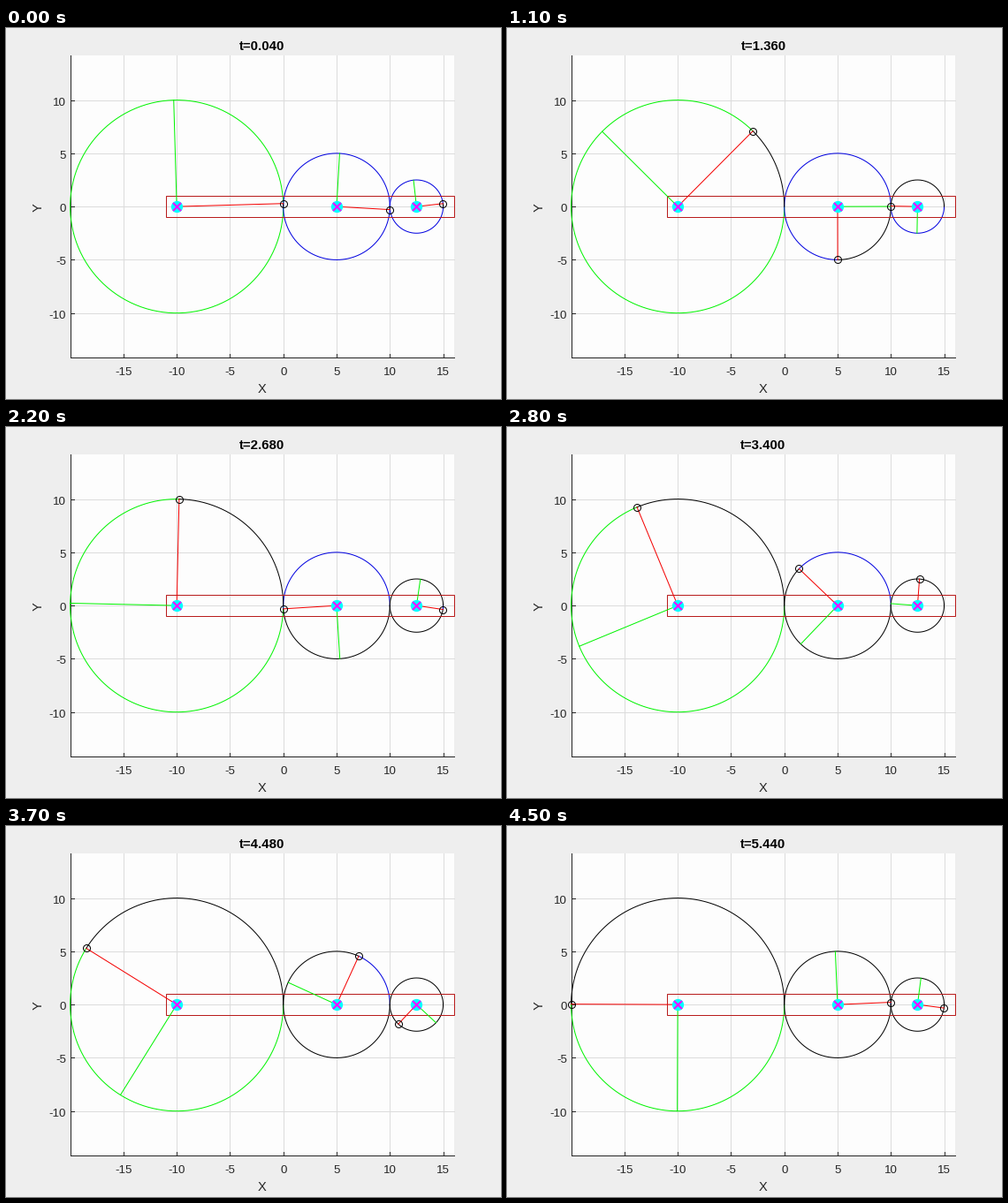
A matplotlib script that plays this animation: 560x420 px, repeating every 4.6 s.

```python
import numpy as np
import matplotlib.pyplot as plt
from matplotlib.animation import FuncAnimation
from matplotlib.patches import Rectangle

W, H, DPI = 560, 420, 100
FRAMES, INTERVAL = 46, 100
PX = 72 / DPI                       # one pixel in points
LEFT, RIGHT, TOP, BOTTOM = 72.6, 506.6, 31, 373.3
SCALE = (RIGHT - LEFT) / 36
MID_Y = (TOP + BOTTOM) / 2
TURN = 2 * np.pi
INK, GRID = "#262626", "#dcdcdc"
GREEN, BLUE, RED = "#00f400", "#0000e0", "#f40000"

plt.rcParams["font.family"] = "Liberation Sans"
fig = plt.figure(figsize=(W / DPI, H / DPI), dpi=DPI, facecolor="#eeeeee")
ax = fig.add_axes([0, 0, 1, 1])
ax.set_xlim(0, W)
ax.set_ylim(H, 0)
ax.axis("off")


def sx(x):
    return LEFT + (x + 20) * SCALE


def sy(y):
    return MID_Y - y * SCALE


def line(xs, ys, color, z, **kw):
    return ax.plot(xs, ys, color=color, lw=PX, zorder=z, **kw)[0]


def label(x, y, text, size, color=INK, **kw):
    kw = {"ha": "center", "va": "baseline", **kw}
    return ax.text(x, y, text, fontsize=size * PX, color=color, **kw)


def draw_axes():
    ax.add_patch(Rectangle((LEFT, TOP), RIGHT - LEFT, BOTTOM - TOP,
                           fc="#fdfdfd", ec="none", zorder=0))
    for v in range(-15, 16, 5):
        x = sx(v)
        line([x, x], [TOP, BOTTOM], GRID, 1)
        line([x, x], [BOTTOM, BOTTOM - 4], INK, 2)
        label(x, 393, str(v), 13.33)
    for v in range(-10, 11, 5):
        y = sy(v)
        line([LEFT, RIGHT], [y, y], GRID, 1)
        line([LEFT, LEFT + 4], [y, y], INK, 2)
        label(68, y + 6, str(v), 13.33, ha="right")
    line([LEFT, LEFT], [TOP, BOTTOM], INK, 2)
    line([LEFT, RIGHT], [BOTTOM, BOTTOM], INK, 2)
    label(290, 413, "X", 14.67)
    label(37, MID_Y + 0.5, "Y", 14.67, va="center", rotation=90)


class Gear:
    def __init__(self, cx, radius, color, turn, step, offset):
        self.cx, self.r, self.turn = cx, radius, turn
        self.step, self.offset = step, offset
        self.rim = line([], [], color, 3, snap=False)
        self.trace = line([], [], "black", 4, snap=False)
        self.red = line([], [], RED, 5, snap=False)
        self.green = line([], [], GREEN, 5, snap=False)
        self.tip = line([], [], "black", 8, marker="o", ms=8 * PX,
                        mfc="none", mew=PX)
        hub = [sx(cx)], [sy(0)]
        line(*hub, "#00ffff", 6, marker="o", ms=13.3 * PX, mew=0)
        line(*hub, "#ff00ff", 7, marker="x", ms=9 * PX, mew=2 * PX)

    def point(self, a):
        return sx(self.cx + self.r * np.cos(a)), sy(self.r * np.sin(a))

    def arc(self, start, end):
        return self.point(self.turn * np.linspace(start, end, 240))

    def spoke(self, a):
        x, y = self.point(a)
        return [sx(self.cx), x], [sy(0), y]

    def update(self, k):
        angle = self.step * k + self.offset
        a = self.turn * angle
        x, y = self.point(a)
        drawn = min(angle, TURN)
        self.trace.set_data(*self.arc(0, drawn))
        self.rim.set_data(*self.arc(drawn, TURN))
        self.red.set_data(*self.spoke(a))
        self.green.set_data(*self.spoke(a + np.pi / 2))
        self.tip.set_data([x], [y])


draw_axes()
gears = [
    Gear(-10, 10, GREEN, 1, 0.02303, 0.0054),
    Gear(5, 5, BLUE, -1, 0.0458, 0.0115),
    Gear(12.5, 2.5, BLUE, 1, 0.0913, 0.02),
]
ax.add_patch(Rectangle((sx(-11), sy(1)), 27 * SCALE, 2 * SCALE,
                       fc="none", ec="#b81c1c", lw=PX, zorder=4.5))
title = label(290, 25, "", 15, "black", weight="bold")


def update(i):
    k = 3 * i + 1
    title.set_text(f"t={0.04 * k:.3f}")
    for gear in gears:
        gear.update(k)
    return []


anim = FuncAnimation(fig, update, frames=FRAMES, interval=INTERVAL,
                     repeat=True, repeat_delay=0, blit=False)
plt.show()
```
